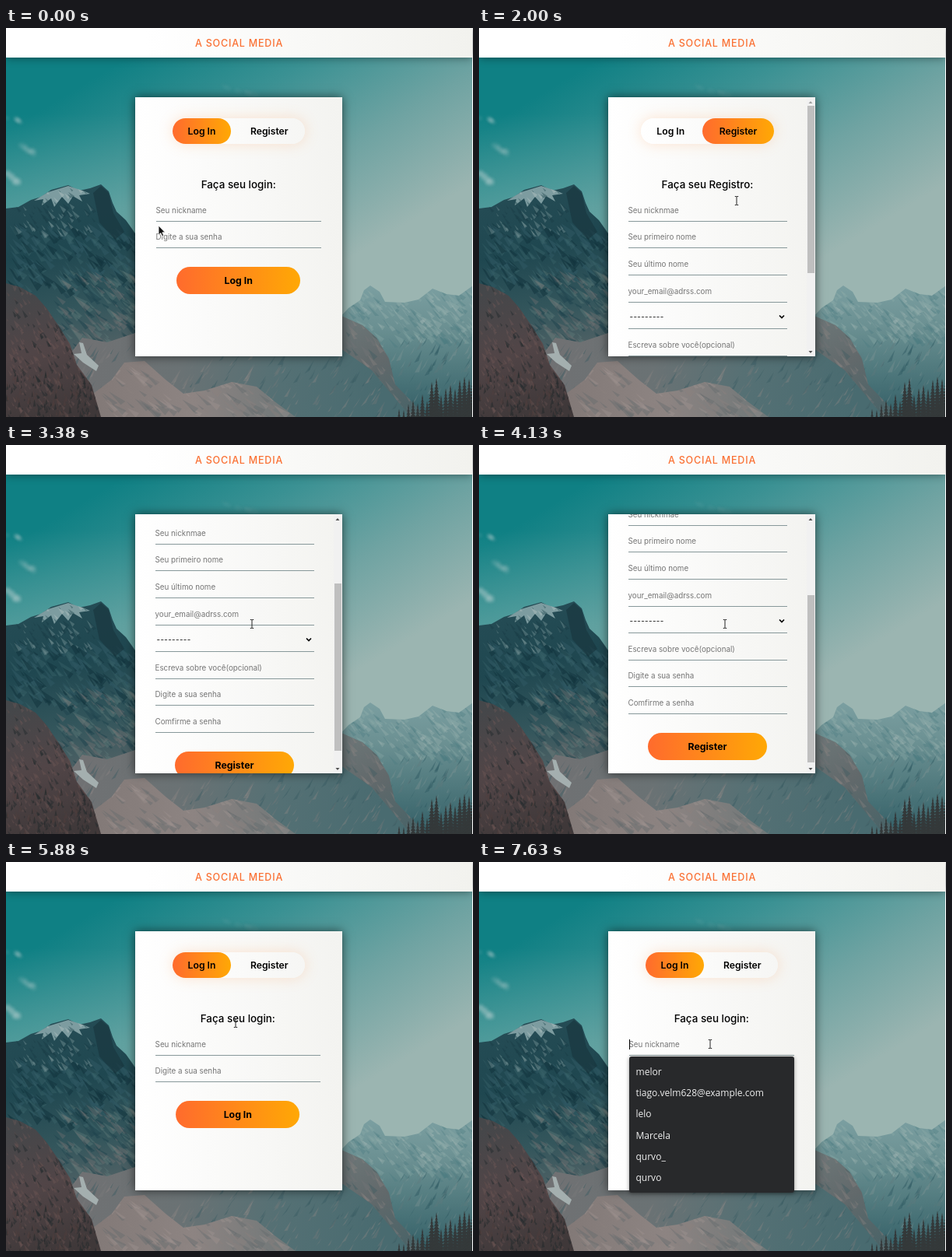
Recreate the animation shown at these times as an HTML page with a canvas. Size 600 by 500 pixels, loop 8000 ms.

```html
<!DOCTYPE html>
<html lang="pt">
<head>
<meta charset="utf-8">
<title>A Social Media</title>
<style>
html, body { margin: 0; width: 100%; height: 100%; overflow: hidden; }
body { position: relative; background: #fff; font-family: Inter, "Open Sans", sans-serif; color: #000; }
body *, canvas { position: absolute; box-sizing: border-box; }
canvas { left: 0; top: 0; }
header { left: 0; top: 0; width: 599px; height: 38px; line-height: 39px; text-align: center;
  color: #fa7033; font-size: 12.5px; font-weight: 500; letter-spacing: .8px;
  background: linear-gradient(90deg, #fff, #fff 30%, #f2f2ee); box-shadow: 0 0 12px #0007; }
#card { left: 166px; top: 89px; width: 265.5px; height: 333px;
  background: linear-gradient(90deg, #fff, #f3f3f0); box-shadow: 0 0 12px #0009; }
#view { height: 333px; overflow: hidden; }
#page { width: 100%; height: 483px; }
#tabs { left: 50%; top: 27px; width: 170.5px; height: 33px; margin-left: -85.25px; border-radius: 17px;
  background: linear-gradient(90deg, #fff, #f6f6f4); box-shadow: 0 0 18px #ffa05a44;
  font-size: 12.2px; font-weight: 600; line-height: 33px; text-align: center; }
#pill, .go { background: linear-gradient(90deg, #ff6b2d, #ffa805); }
#pill { height: 33px; border-radius: 17px; }
.form { width: 100%; height: 100%; }
.form h1 { margin: 0; top: 102px; width: 100%; text-align: center; font-size: 13.4px; font-weight: 500; line-height: 20px; }
.field { left: 10%; width: 80%; height: 30px; line-height: 31px; border-bottom: 1px solid #87989a;
  color: #757575; font-size: 9.8px; white-space: nowrap; }
.select { color: #000; padding-left: 2px; letter-spacing: .4px; line-height: 29px; }
.select svg { right: 3px; top: 11px; }
.go { left: 20%; width: 60%; height: 35px; border-radius: 18px; line-height: 35px; text-align: center;
  font-size: 12.3px; font-weight: 700; }
#bar { right: 0; top: 0; width: 10.5px; height: 333px; background: #f1f1f1; }
#thumb { left: 1px; width: 8.5px; height: 215px; background: #bfbfbf; }
#caret { left: 192.5px; top: 228px; width: 1px; height: 13px; background: #000; }
#list { left: 192.5px; top: 250px; width: 212.5px; height: 175px; padding: 6px 9px; border-radius: 3px;
  background: #28292b; color: #eee; box-shadow: 0 1px 5px #0006;
  font: 12px/27.2px "Open Sans", "Noto Sans", sans-serif; }
#list div { position: static; }
.cursor { left: 0; top: 0; overflow: visible; }
</style>
</head>
<body>
<canvas id="scene" width="599" height="500"></canvas>
<header>A SOCIAL MEDIA</header>
<div id="card">
  <div id="view">
    <div id="page">
      <div id="tabs">
        <div id="pill"></div>
        <span style="left:0;width:76px">Log In</span>
        <span style="left:79px;width:91.5px">Register</span>
      </div>
      <div class="form" id="login"></div>
      <div class="form" id="register"></div>
    </div>
  </div>
  <div id="bar">
    <div id="thumb"></div>
    <svg width="10" height="333"><path id="up" d="M2.5 8L5 5L7.5 8Z"/><path fill="#505050" d="M2.5 326L5 329L7.5 326Z"/></svg>
  </div>
</div>
<div id="caret"></div>
<div id="list"></div>
<svg class="cursor" id="arrow" width="20" height="20"><path d="M0 -1V11L2.8 8.6L4.6 12.6L6.6 11.7L4.8 7.8H8.4Z" fill="#111" stroke="#fff" stroke-width=".8"/></svg>
<svg class="cursor" id="hand" width="20" height="20"><path d="M-1 1Q.2 -.6 1.2 1V5L8 6.2Q9.3 6.7 9 8.4L7.8 14H1.2L-3.4 8.8Q-3 7 -1 8.2Z" fill="#fff" stroke="#111"/><path d="M3.5 5.5V8M6 6V8" stroke="#111" stroke-width=".8"/></svg>
<svg class="cursor" id="beam" width="20" height="20"><path d="M-2.2 -5.5H-.6L0 -5L.6 -5.5H2.2M0 -5V5M-2.2 5.5H-.6L0 5L.6 5.5H2.2" fill="none" stroke="#222"/></svg>
<script>
const $ = id => document.getElementById(id);
const STEP = 125, LOOP = 8000;

// ---- landscape ----
const g = $('scene').getContext('2d');
let seed = 7;
const rnd = (a, b) => {
  seed = (seed * 16807) % 2147483647;
  return a + (b - a) * seed / 2147483647;
};

function gradient(x0, y0, x1, y1, ...colors) {
  const fill = g.createLinearGradient(x0, y0, x1, y1);
  colors.forEach((c, i) => fill.addColorStop(i / (colors.length - 1), c));
  return fill;
}

function shape(d, fill) {
  const path = new Path2D(d);
  g.fillStyle = fill;
  g.fill(path);
  return path;
}

// Scatter slanted facets inside a shape to suggest rough rock.
function rough(path, [x0, y0, x1, y1], count, tones, size, lean) {
  g.save();
  g.clip(path);
  for (let i = 0; i < count; i++) {
    const x = rnd(x0, x1), y = rnd(y0, y1), s = rnd(size / 3, size);
    g.fillStyle = tones[i % tones.length];
    g.beginPath();
    g.moveTo(x, y);
    g.lineTo(x + lean * s, y + s);
    g.lineTo(x + lean * s + s * .35, y + s * rnd(.5, 1));
    g.fill();
  }
  g.restore();
}

function cloud(x, y, w, h, alpha) {
  g.save();
  g.filter = 'blur(2px)';
  g.fillStyle = `rgba(200,216,214,${alpha})`;
  for (let i = 0; i < 7; i++) {
    const k = rnd(-1, 1);
    g.beginPath();
    g.ellipse(x + k * w, y + k * h + rnd(-2, 2), w * rnd(.2, .5), h * rnd(.3, .6), .4, 0, 7);
    g.fill();
  }
  g.restore();
}

function drawScene() {
  g.fillStyle = gradient(170, 30, 360, 345, '#0f8084', '#3a9193', '#6fa3a2', '#9bb5b1');
  g.fillRect(0, 0, 600, 500);
  // Haze above the left ridge
  g.fillStyle = gradient(0, 110, 0, 230, '#7fb0ac00', '#7fb0ac66');
  g.fillRect(0, 110, 170, 160);
  cloud(10, 117, 9, 3, .35);
  cloud(24, 154, 13, 7, .22);
  cloud(5, 190, 11, 9, .3);
  cloud(300, 81, 20, 4, .08);

  const far = shape('M425 376L440 360L455 350L460 337L468 331L480 339L487 352L512 353L530 349L548 335L566 342L582 344L600 331V500H425Z',
    gradient(0, 330, 0, 490, '#7b9fa1', '#6b9092', '#517a7e', '#38636a'));
  rough(far, [430, 335, 600, 400], 200, ['#a7bab944', '#4a787e55', '#8eaaa955'], 15, .7);
  rough(far, [440, 395, 600, 500], 160, ['#83979755', '#2e596177', '#60797b55'], 18, -.6);

  const near = shape('M400 350L431 370L458 382L476 398L492 425L500 458L540 500H400Z',
    gradient(431, 370, 500, 500, '#6d7879', '#62696b', '#4b6468'));
  rough(near, [425, 370, 530, 500], 120, ['#91878555', '#3d5a6066', '#77777855'], 16, .5);

  const peak = shape('M0 232L16 230L32 221L45 217L58 208L80 202L94 209L108 206L122 201L132 210L137 225L142 236L154 247L166 264L200 300V500H0Z',
    gradient(60, 205, 110, 440, '#254c55', '#1f4750', '#34565c', '#5a6568'));
  rough(peak, [0, 250, 170, 330], 200, ['#3f6a7155', '#11333c88', '#2d5660aa'], 20, .6);
  rough(peak, [60, 310, 170, 430], 200, ['#66807f55', '#1d424b77', '#7c777755'], 19, .75);
  shape('M112 212L122 203L132 212L138 238L152 262L140 272L120 250Z', '#18353d99');
  const snow = shape('M36 222L54 211L80 203L101 210L108 213L94 215L98 223L86 216L80 226L72 217L62 230L58 219L46 228L48 220Z', '#7d9ca0');
  rough(snow, [30, 200, 112, 230], 40, ['#a5b9ba99', '#41666caa'], 9, .6);
  rough(peak, [10, 225, 110, 262], 70, ['#7d999b66', '#1b3f4888'], 12, .5);

  const base = shape('M78 425L98 398L130 404L166 392L300 400L420 405L470 440L520 500H100Z',
    gradient(100, 400, 480, 490, '#707173', '#6a7274', '#547074', '#496b70'));
  rough(base, [90, 400, 510, 500], 280, ['#94898655', '#36586066', '#7c7c7c55'], 19, -.7);
  const scree = shape('M112 470L136 452L152 430L178 428L205 452L228 470L255 466L290 455L322 461L345 480L372 500H110Z',
    gradient(110, 0, 370, 0, '#827977', '#8d8482', '#6f7778'));
  rough(scree, [110, 425, 370, 500], 170, ['#a2979455', '#62696b66', '#8b807d66'], 18, .9);
  shape('M94 404L99 405L104 420L119 434L116 441L99 430L87 419L97 418Z', '#a4afaf');

  const slope = shape('M0 328L18 333L38 344L52 360L67 382L82 406L91 433L110 459L122 500H0Z',
    gradient(20, 330, 70, 500, '#44474a', '#514547', '#3f3839'));
  rough(slope, [0, 328, 120, 500], 380, ['#6c545155', '#20292c77', '#81635e44'], 11, .35);
  rough(slope, [0, 440, 122, 500], 150, ['#252b2c99', '#54403e66'], 11, -.15);

  for (let x = 505; x < 606; x += 6) {
    const top = 490 - (x - 505) * .44 + rnd(-6, 8) - (Math.abs(x - 550) < 4 ? 14 : 0);
    g.fillStyle = ['#25363a', '#34393a', '#3d3a38'][x % 3];
    for (let y = top, w = 1; y < 500; y += 4, w += .7) {
      g.beginPath();
      g.moveTo(x, y);
      g.lineTo(x - w, y + 6);
      g.lineTo(x + w, y + 6);
      g.fill();
    }
  }
}

// ---- forms ----
function buildForm(id, title, fields, button, buttonTop) {
  const rows = fields.map((text, i) => {
    const select = text[0] === '-';
    const chevron = '<svg width="8" height="7"><path d="M1 1.5L4 4.5L7 1.5" fill="none" stroke="#000" stroke-width="1.7"/></svg>';
    return `<div class="field${select ? ' select' : ''}" style="top:${129.8 + 34.6 * i}px">${text}${select ? chevron : ''}</div>`;
  });
  $(id).innerHTML = `<h1>${title}</h1>${rows.join('')}<div class="go" style="top:${buttonTop}px">${button}</div>`;
}
buildForm('login', 'Faça seu login:', ['Seu nickname', 'Digite a sua senha'], 'Log In', 218);
buildForm('register', 'Faça seu Registro:', ['Seu nicknmae', 'Seu primeiro nome', 'Seu último nome',
  'your_email@adrss.com', '---------', 'Escreva sobre você(opcional)', 'Digite a sua senha',
  'Comfirme a senha'], 'Register', 426);
$('list').innerHTML = ['melor', 'tiago.velm628@example.com', 'lelo', 'Marcela', 'qurvo_', 'qurvo']
  .map(name => `<div>${name}</div>`).join('');

// ---- motion ----
// Standard "ease" curve: cubic-bezier(.25, .1, .25, 1).
function ease(x) {
  if (x <= 0 || x >= 1) return x <= 0 ? 0 : 1;
  let lo = 0, hi = 1, s = .5;
  for (let i = 0; i < 20; i++) {
    s = (lo + hi) / 2;
    if (.75 * s * (1 - s) + s ** 3 < x) lo = s; else hi = s;
  }
  return .3 * (1 - s) ** 2 * s + 3 * (1 - s) * s * s + s ** 3;
}
const ramp = (t, start, length) => ease((t - start) / length);

// Pointer stops: step, x, y, look
const stops = [
  [0, 196, 255, 'arrow'], [2, 228, 224, 'arrow'], [4, 228, 224, 'arrow'], [7, 329, 135, 'hand'],
  [12, 329, 135, 'hand'], [13, 330, 157, 'arrow'], [16, 331, 222, 'beam'], [22, 316, 230, 'beam'],
  [33, 316, 230, 'beam'], [36, 284, 190, 'arrow'], [39, 251, 152, 'arrow'], [40, 251, 152, 'arrow'],
  [42, 244, 141, 'hand'], [44, 244, 141, 'hand'], [45, 258, 160, 'arrow'], [47, 295, 207, 'beam'],
  [50, 297, 234, 'beam'], [64, 297, 234, 'beam']
];

function movePointer(step) {
  const i = stops.findIndex(s => s[0] > step);
  const [s0, x0, y0, look] = stops[i - 1], [s1, x1, y1] = stops[i];
  const k = (step - s0) / (s1 - s0);
  for (const id of ['arrow', 'hand', 'beam']) $(id).style.display = id === look ? '' : 'none';
  $(look).style.transform = `translate(${x0 + (x1 - x0) * k}px,${y0 + (y1 - y0) * k}px)`;
}

const show = (id, on) => { $(id).style.visibility = on ? 'visible' : 'hidden'; };

function render(now) {
  const step = Math.floor(now % LOOP / STEP), t = step * STEP;
  const slide = ramp(t, 1118, 500) - ramp(t, 5415, 500);
  const scroll = 107 * ramp(t, 2010, 700) + 43 * ramp(t, 3312, 300) - 150 * ramp(t, 4090, 650);
  const tall = step >= 9 && step < 44;

  $('view').style.width = (tall ? 255 : 265.5) + 'px';
  $('bar').style.display = tall ? '' : 'none';
  $('page').style.transform = `translateY(${-Math.round(scroll)}px)`;
  $('thumb').style.top = 11 + scroll * .645 + 'px';
  $('up').setAttribute('fill', scroll > 1 ? '#505050' : '#a0a0a0');
  $('login').style.transform = `translateX(${-slide * 100}%)`;
  $('register').style.transform = `translateX(${(1 - slide) * 100}%)`;
  $('pill').style.left = 79 * slide + 'px';
  $('pill').style.width = 75 + 16.5 * slide + 'px';
  show('list', step >= 51);
  show('caret', step >= 51 && (step < 56 || step >= 61));
  movePointer(step);
}

drawScene();
const begin = performance.now();
function tick() {
  render(performance.now() - begin);
  requestAnimationFrame(tick);
}
tick();
</script>
</body>
</html>
```
